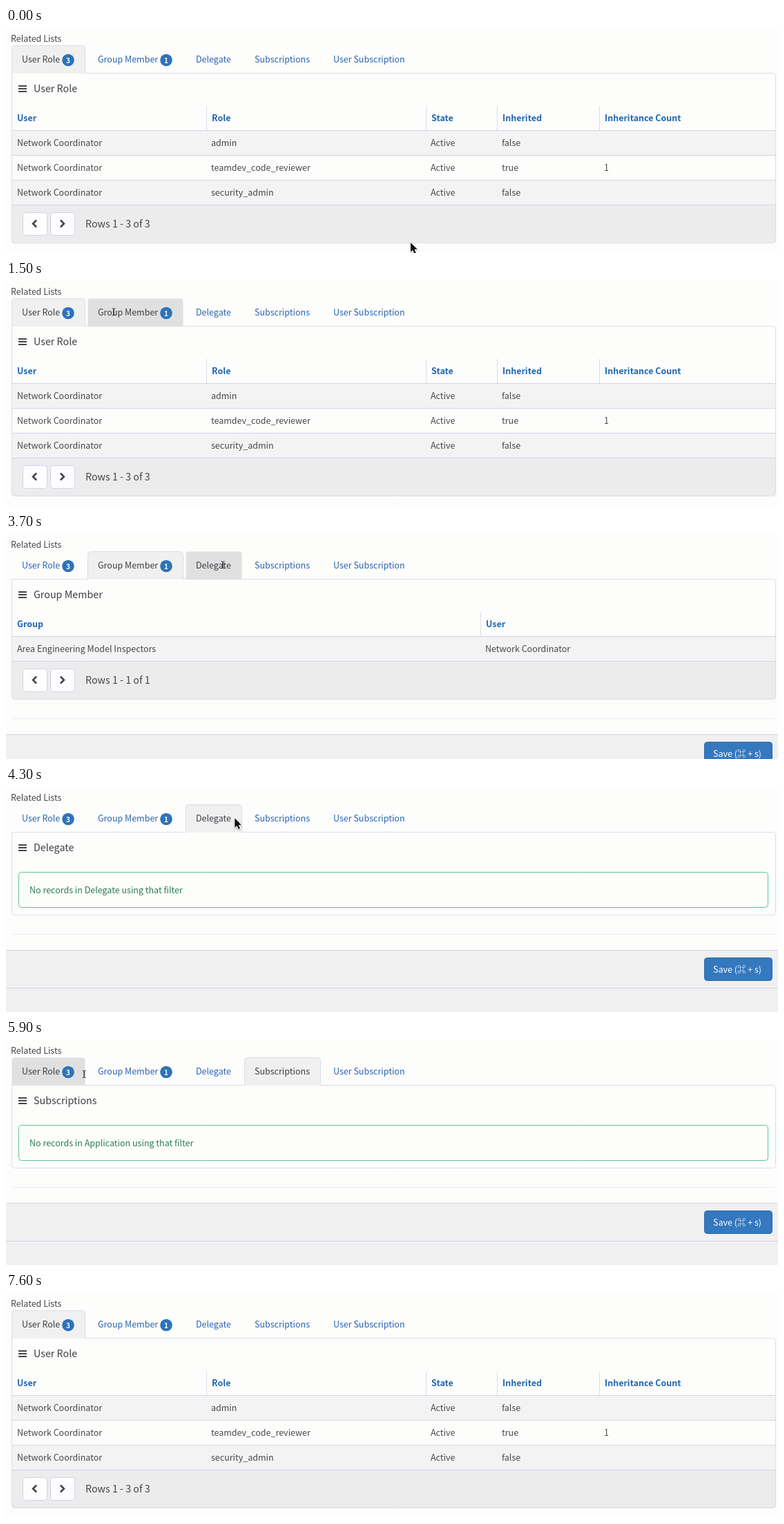
Animation, 1118 px wide and 326 px high, one loop 7.9 s. Source, as an HTML page with a canvas:

```html
<!DOCTYPE html>
<html lang="en">
<head>
<meta charset="utf-8">
<title>Related Lists</title>
<style>
  html, body { margin: 0; width: 100%; height: 100%; overflow: hidden; background: #fdfdfc; }
  canvas { display: block; width: 1118px; height: 326px; }
</style>
</head>
<body>
<canvas id="stage"></canvas>
<script>
const W = 1118, H = 326, LOOP = 7900, STEP = 100;
const canvas = document.getElementById('stage');
const ctx = canvas.getContext('2d');
const ratio = window.devicePixelRatio || 1;
canvas.width = W * ratio;
canvas.height = H * ratio;

const FAMILY = '"Noto Sans CJK SC", "Noto Sans CJK JP", "Noto Sans CJK", "Noto Sans", sans-serif';
const SMALL = 12.5, LARGE = 14.3;
const C = {
  page: '#fdfdfc', stripe: '#f3f3f3', foot: '#ececed', tab: '#f0f0f0', hover: '#e0e0e1',
  border: '#dcdcee', line: '#d3d3ec', text: '#45464a', title: '#3c3e44',
  link: '#2a63b0', head: '#2167b0', badge: '#2e73b8', button: '#3478be',
  green: '#5fc39a', greenText: '#2b7a58', white: '#fdfdfd'
};

const TABS = [
  { name: 'User Role', x: 8, w: 107, badge: 3, badgeX: 90 },
  { name: 'Group Member', x: 118, w: 139, badge: 1, badgeX: 232 },
  { name: 'Delegate', x: 260, w: 82, records: 'Delegate' },
  { name: 'Subscriptions', x: 345, w: 111, records: 'Application' },
  { name: 'User Subscription', x: 459, w: 135 }
];

const ADMIN = 'Network Coordinator';
const TABLES = [
  {
    cols: [['User', 16], ['Role', 298], ['State', 616], ['Inherited', 719], ['Inheritance Count', 867]],
    rows: [
      [ADMIN, 'admin', 'Active', 'false', ''],
      [ADMIN, 'teamdev_code_reviewer', 'Active', 'true', '1'],
      [ADMIN, 'security_admin', 'Active', 'false', '']
    ]
  },
  {
    cols: [['Group', 16], ['User', 695]],
    rows: [['Area Engineering Model Inspectors', ADMIN]]
  }
];

// [time, active tab]
const CLICKS = [[0, 0], [2100, 1], [3800, 2], [5000, 3], [6400, 0]];

// [time, x, y] of the pointer
const PATH = [
  [0, 586, 311], [800, 572, 301], [1400, 156, 45], [1600, 156, 45], [2100, 181, 42],
  [2400, 181, 42], [3600, 314, 45], [4100, 314, 45], [4900, 425, 47], [5500, 425, 47],
  [6000, 77, 50], [7400, 77, 50], [7500, 331, 308]
];
const POINTER_END = 7600;

function text(str, x, y, color = C.text, size = SMALL, weight = 400) {
  ctx.font = `${weight} ${size}px ${FAMILY}`;
  ctx.fillStyle = color;
  ctx.fillText(str, x, y);
}

function rect(x, y, w, h, color) {
  ctx.fillStyle = color;
  ctx.fillRect(x, y, w, h);
}

function box(x, y, w, h, radius, fill, stroke) {
  ctx.beginPath();
  ctx.roundRect(x + 0.5, y + 0.5, w - 1, h - 1, radius);
  if (fill) { ctx.fillStyle = fill; ctx.fill(); }
  if (stroke) { ctx.strokeStyle = stroke; ctx.lineWidth = 1; ctx.stroke(); }
}

function drawTab(tab, active, hovered) {
  if (active) {
    box(tab.x, 25, tab.w, 44, [4, 4, 0, 0], C.tab, C.border);
  } else if (hovered) {
    box(tab.x, 25, tab.w, 41, [4, 4, 0, 0], C.hover);
  }
  text(tab.name, tab.x + 15, 50, active || hovered ? C.title : C.link);
  if (!tab.badge) return;
  ctx.beginPath();
  ctx.arc(tab.badgeX, 46.5, 8.8, 0, Math.PI * 2);
  ctx.fillStyle = C.badge;
  ctx.fill();
  ctx.textAlign = 'center';
  text(tab.badge, tab.badgeX, 50.5, '#fff', 10, 700);
  ctx.textAlign = 'left';
}

function pageButton(x, y, dir) {
  box(x, y, 36, 34, 4, C.white, C.line);
  const cx = x + 17.5, cy = y + 16.5;
  ctx.beginPath();
  ctx.moveTo(cx - dir * 2.6, cy - 5);
  ctx.lineTo(cx + dir * 2.4, cy);
  ctx.lineTo(cx - dir * 2.6, cy + 5);
  ctx.strokeStyle = C.text;
  ctx.lineWidth = 2.6;
  ctx.stroke();
}

function drawTable({ cols, rows }, bottom) {
  cols.forEach(([name, x], i) => {
    if (i) rect(x - 8, 113, 1, 35, C.border);
    text(name, x, 135, C.head, SMALL, 700);
  });
  rows.forEach((row, r) => {
    const y = 148 + r * 36;
    if (r % 2 === 0) rect(9, y, 1105, 36, C.stripe);
    rect(9, y, 1105, 1, C.line);
    row.forEach((cell, i) => text(cell, cols[i][1] - (i ? 1 : 0), y + 23));
  });
  const top = 148 + rows.length * 36;
  box(8, top, 1107, bottom - top + 1, [0, 0, 4, 4], C.foot, C.border);
  rect(9, top, 1105, 1, C.line);
  pageButton(24, top + 11, -1);
  pageButton(64, top + 11, 1);
  text(`Rows 1 - ${rows.length} of ${rows.length}`, 115, top + 33, C.text, LARGE);
}

function drawEmpty(records) {
  box(18, 123, 1086, 52, 4, null, C.green);
  text(`No records in ${records} using that filter`, 34, 154, C.greenText);
}

function drawSaveBar(bottom) {
  rect(8, bottom + 28, 1106, 1, '#ececf2');
  const top = bottom + 51;
  rect(0, top, W, H, C.tab);
  rect(0, top, W, 1, C.line);
  rect(0, top + 55, W, 1, C.line);
  box(1011, top + 11, 99, 34, 4, C.button, '#2d6cae');
  text('Save (⌘ + s)', 1024, top + 33, '#fff', SMALL, 500);
}

function pointerAt(t) {
  if (t >= POINTER_END) return null;
  const i = PATH.findIndex(key => key[0] > t);
  if (i < 0) return { x: PATH.at(-1)[1], y: PATH.at(-1)[2] };
  const [t0, x0, y0] = PATH[i - 1], [t1, x1, y1] = PATH[i];
  const u = (t - t0) / (t1 - t0), k = u * u * (3 - 2 * u);
  return { x: x0 + (x1 - x0) * k, y: y0 + (y1 - y0) * k };
}

function drawArrow({ x, y }) {
  ctx.save();
  ctx.translate(x, y);
  ctx.beginPath();
  [[0, 0], [0, 13.5], [3.1, 10.7], [5.4, 15.8], [7.6, 14.8], [5.4, 9.8], [9.6, 9.6]]
    .forEach(p => ctx.lineTo(...p));
  ctx.closePath();
  ctx.shadowColor = 'rgba(0,0,0,.3)';
  ctx.shadowBlur = 2 * ratio;
  ctx.shadowOffsetY = ratio;
  ctx.strokeStyle = '#fff';
  ctx.lineWidth = 1.6;
  ctx.stroke();
  ctx.shadowColor = 'transparent';
  ctx.fillStyle = '#111';
  ctx.fill();
  ctx.restore();
}

function drawBeam({ x, y }) {
  ctx.strokeStyle = '#2c2c30';
  ctx.lineWidth = 1;
  ctx.beginPath();
  for (const side of [-2.5, 2.5]) {
    ctx.moveTo(x + side, y - 5.5);
    ctx.quadraticCurveTo(x, y - 5.5, x, y - 3.5);
    ctx.lineTo(x, y + 3);
    ctx.quadraticCurveTo(x, y + 5, x + side, y + 5);
  }
  ctx.stroke();
}

function draw(t) {
  const active = CLICKS.findLast(click => click[0] <= t)[1];
  const pointer = pointerAt(t);
  const over = pointer && pointer.y > 25 && pointer.y < 65
    ? TABS.findIndex(tab => pointer.x >= tab.x && pointer.x < tab.x + tab.w) : -1;
  const current = TABS[active], table = TABLES[active];
  const bottom = table ? 203 + table.rows.length * 36 : 185;

  ctx.setTransform(ratio, 0, 0, ratio, 0, 0);
  rect(0, 0, W, H, C.page);
  text('Related Lists', 7, 20);
  TABS.forEach((tab, i) => drawTab(tab, i === active, i === over));
  box(8, 65, 1107, bottom - 64, [0, 4, 4, 4], C.page, C.border);
  rect(current.x + 1, 65, current.w - 2, 1, C.tab);

  for (let i = 0; i < 3; i++) rect(18, 83 + i * 4, 12, 2, C.text);
  text(current.name, 40, 93, C.title, LARGE);
  if (table) drawTable(table, bottom);
  else drawEmpty(current.records);
  drawSaveBar(bottom);

  if (!pointer) return;
  if (over >= 0 && over !== active) drawBeam(pointer);
  else drawArrow(pointer);
}

const start = performance.now();
function frame() {
  const t = (performance.now() - start) % LOOP;
  draw(Math.floor(t / STEP) * STEP);
  requestAnimationFrame(frame);
}
frame();
</script>
</body>
</html>
```
